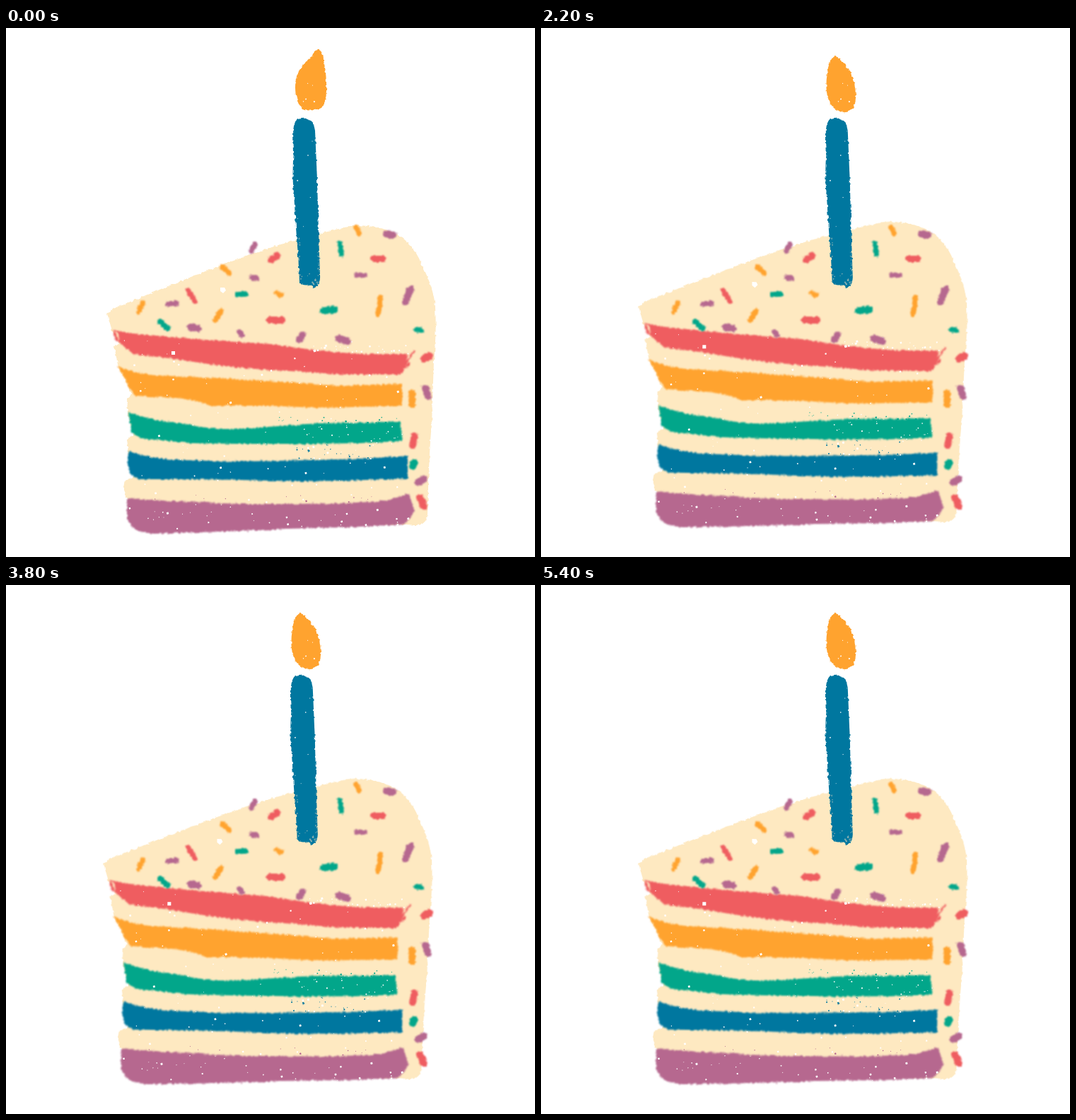
Recreate the animation shown at these times as an HTML page. Size 748x748 px, loop 5.61 s.

```html
<!DOCTYPE html>
<html lang="en">
<head>
<meta charset="utf-8">
<title>Birthday cake</title>
<style>
  html, body { margin: 0; width: 100%; height: 100%; overflow: hidden; background: #fff; }
  svg { display: block; width: 100vw; height: 100vh; }
  .cream { fill: #fee9c1; }
  .red { fill: #ef5d60; --ink: #ef5d60; }
  .orange { fill: #ffa32f; --ink: #ffa32f; }
  .green { fill: #02a68a; --ink: #02a68a; }
  .blue { fill: #00779f; }
  .purple { fill: #b6688f; --ink: #b6688f; }
  .sprinkles path { fill: none; stroke: var(--ink); stroke-linecap: round; }
  .thin { stroke-width: 7.5; }
  .fat { stroke-width: 10; }
  .flame { visibility: hidden; }
  .flame.on { visibility: visible; }
</style>
</head>
<body>
<svg viewBox="0 0 748 748" xmlns="http://www.w3.org/2000/svg">
  <defs>
    <filter id="rough" filterUnits="userSpaceOnUse" x="0" y="0" width="748" height="748" color-interpolation-filters="sRGB">
      <feTurbulence type="fractalNoise" baseFrequency=".2" numOctaves="2" seed="4"/>
      <feDisplacementMap in="SourceGraphic" scale="4" xChannelSelector="R" yChannelSelector="G"/>
    </filter>
    <filter id="chalk" filterUnits="userSpaceOnUse" x="0" y="0" width="748" height="748" color-interpolation-filters="sRGB">
      <feTurbulence type="fractalNoise" baseFrequency=".25" numOctaves="2" seed="9"/>
      <feDisplacementMap in="SourceGraphic" scale="5" xChannelSelector="R" yChannelSelector="G"/>
      <feGaussianBlur stdDeviation=".9"/>
    </filter>
  </defs>

  <g id="cake">
    <path class="cream" filter="url(#rough)" d="M143 404L152 397Q220 368 300 337Q360 315 385 307Q440 291 487 280Q510 277 540 286Q574 298 588 335Q605 368 607 395Q609 430 605 470L602 560Q598 600 596 688Q594 703 580 703L565 702L190 695L172 667Q163 655 168 640L180 636L173 600L171 582L180 575L172 545L171 524L178 518L158 476L153 450L160 446L150 428Z"/>
    <g filter="url(#chalk)">
      <path class="red" d="M151 427L180 432L270 440L375 447L440 456L500 461L568 461L565 480L558 490L480 490L400 485Q340 482 300 477L230 467L180 461L165 449L155 441Z"/>
      <path d="M565 475L577 457M561 484L571 473" stroke="#ef5d60" stroke-width="2.5"/>
      <path d="M156 429L160 443" stroke="#fee9c1" stroke-width="2"/>
      <path class="orange" d="M158 478Q180 488 210 491L300 495L400 501L470 506L560 503L560 534L490 536L440 537L370 534L290 534Q262 525 240 523L182 520L170 500Z"/>
      <path class="green" d="M173 543Q200 554 250 559Q285 567 310 567Q340 567 370 564L440 559L557 557L561 584L500 587L430 588L330 588L260 587L190 580L178 573Z"/>
      <path class="blue" d="M173 598Q200 609 250 611L330 613L430 611L500 609L568 605L568 637L480 640L420 641L330 639L260 638L190 638Q176 634 172 622Z"/>
      <path class="purple" d="M171 665L200 667L260 670L330 673L400 673L480 672L540 668L570 658L577 682Q572 697 560 702L480 706L400 708L310 712L210 715Q184 713 177 704L171 693Z"/>
    </g>
    <g id="cakeSpecks"></g>
    <path fill="#fff" d="M303 367h6l2 4l-4 4l-4-3zM234 457h5v5h-5z"/>
  </g>

  <g id="candle">
    <path class="blue" filter="url(#rough)" d="M410 131Q414 127 425 128Q435 131 437 145L440 215L442 290L444 350Q445 364 436 367L428 363Q420 365 415 360Q414 330 411 297L407 235Q404 205 407 175L406 150Q406 137 410 131Z"/>
    <g id="candleSpecks"></g>
  </g>

  <g class="sprinkles" filter="url(#chalk)">
    <g class="orange">
      <path class="thin" d="M193 389l-5 12M306 338l9 8M304 400l-8 13M383 375l6 2M495 282l4 8M530 381l-4 24"/>
      <path class="fat" d="M574 517v15"/>
    </g>
    <g class="purple">
      <path class="thin" d="M352 306l-5 9M348 353h6M229 390l12 -1M330 430l4 4M497 349l10 1"/>
      <path class="fat" d="M261 423l10 2M419 434l-4 7M471 439l12 4M538 291l9 2M572 369l-7 18M593 509l4 12M583 642l8 -4"/>
    </g>
    <g class="red">
      <path class="thin" d="M258 372l9 14"/>
      <path class="fat" d="M375 328l8 -6M373 413h17M520 326h12M591 468l8 -4M578 577l-3 13M585 664l6 12"/>
    </g>
    <g class="green">
      <path class="thin" d="M218 415l11 10M328 377l11 -1M472 305l2 15M580 427h7"/>
      <path class="fat" d="M449 400l16 -2M577 614l-2 6"/>
    </g>
  </g>

  <g class="orange" filter="url(#rough)">
    <path class="flame" d="M436 33L441 30Q449 33 449 45Q454 70 453 88Q453 105 446 113Q432 119 419 115Q408 100 409 82Q409 66 418 55Q428 42 434 40Z"/>
    <path class="flame" d="M417 39Q410 42 407 52Q402 75 404 92Q409 113 419 116Q428 122 437 117Q446 110 445 95Q444 75 440 68Q432 52 424 45Z"/>
    <path class="flame" d="M430 6Q421 20 415 42Q407 66 408 86Q412 108 424 113Q438 117 446 108Q453 94 449 72Q446 50 440 30Q437 12 430 6Z"/>
  </g>
  <g id="flameSpecks"></g>
</svg>

<script>
const $ = id => document.getElementById(id);

let seed = 7;
const rnd = () => (seed = seed * 16807 % 2147483647) / 2147483647;

// Scatter small dots over a box.
function scatter(id, color, count, x, y, w, h, big = 2.4) {
  let d = "";
  for (let i = 0; i < count; i++) {
    const s = 0.8 + rnd() * rnd() * big;
    d += `M${x + rnd() * w} ${y + rnd() * h}l${s} ${-s / 3}l${s / 3} ${s}l${-s} ${s / 3}z`;
  }
  const path = document.createElementNS("http://www.w3.org/2000/svg", "path");
  path.setAttribute("d", d);
  path.setAttribute("fill", color);
  $(id).append(path);
}

scatter("cakeSpecks", "#fff", 120, 165, 440, 405, 265);
scatter("cakeSpecks", "#fff", 22, 400, 448, 165, 13, 3.5);
scatter("cakeSpecks", "#fff", 25, 180, 686, 380, 24);
scatter("cakeSpecks", "#fff", 22, 420, 558, 140, 30, 1.5);
scatter("cakeSpecks", "#00779f", 22, 410, 589, 110, 20, 2);
scatter("cakeSpecks", "#02a68a", 18, 385, 550, 170, 9, 2);
scatter("cakeSpecks", "#b6688f", 12, 180, 660, 370, 10, 2);
scatter("candleSpecks", "#fff", 6, 408, 140, 28, 150, 1.5);
scatter("candleSpecks", "#8fb3b3", 22, 415, 347, 27, 17, 1.8);
scatter("candleSpecks", "#8fb3b3", 12, 412, 295, 3, 55, 1.4);
scatter("candleSpecks", "#8fb3b3", 12, 440, 295, 3, 55, 1.4);
scatter("flameSpecks", "#fff", 5, 413, 70, 26, 38, 1.8);

// Each pose: cake and candle as [dx, dy, degrees], and the flame shape.
const poses = [
  { cake: [0, 0, 0], candle: [0, 0, 0], flame: 0 },
  { cake: [-6, -5.6, -0.78], candle: [6, 8, -1.4], flame: 1 },
  { cake: [4, -3, 0], candle: [2, -5, 0], flame: 2 },
  { cake: [-6.8, -7, 0.72], candle: [-3.3, 0, 0], flame: 1 }
];
const flames = document.querySelectorAll(".flame");
const LOOP = 5610, STEP = 200, LAST = 27;

function place(id, [dx, dy, turn], pivot) {
  $(id).setAttribute("transform", `translate(${dx} ${dy}) rotate(${turn} ${pivot})`);
}

let shown = -1;
function draw(time) {
  const index = Math.min(LAST, Math.floor(time % LOOP / STEP)) % poses.length;
  if (index === shown) return;
  shown = index;
  const pose = poses[index];
  place("cake", pose.cake, "375 550");
  place("candle", pose.candle, "425 247");
  flames.forEach((el, i) => el.classList.toggle("on", i === pose.flame));
}

const start = performance.now();
function tick() {
  draw(performance.now() - start);
  requestAnimationFrame(tick);
}
tick();
</script>
</body>
</html>
```
